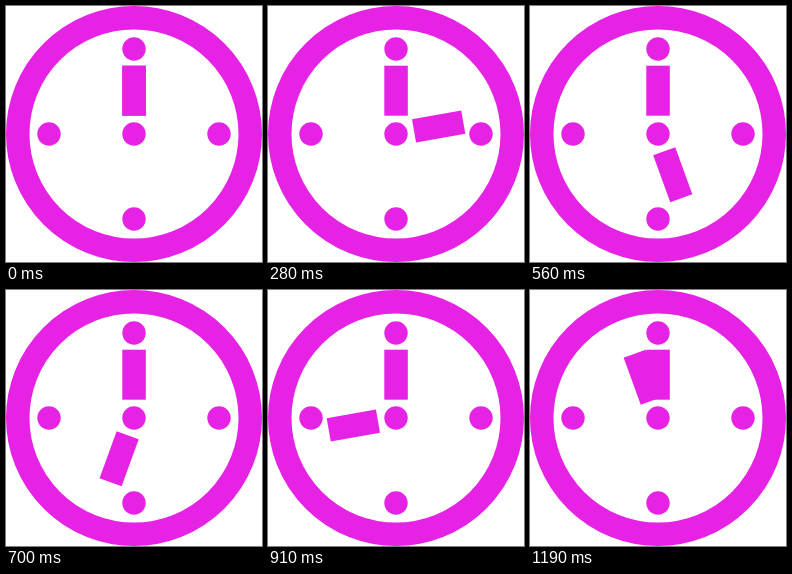
Write an HTML page that moves like this. It is 256 by 256 pixels and loops after 1260 ms.

```html
<!DOCTYPE html>
<html lang="en">
<head>
<meta charset="utf-8">
<title>Clock</title>
<style>
  html, body { margin: 0; width: 100%; height: 100%; overflow: hidden; background: #fff; }
  svg { display: block; width: 100%; height: 100%; fill: #e622e4; }
</style>
</head>
<body>
<svg viewBox="0 0 256 256">
  <circle cx="128" cy="128" r="116.25" fill="none" stroke="#e622e4" stroke-width="23.5"/>
  <circle cx="128" cy="43" r="11.7"/>
  <circle cx="213" cy="128" r="11.7"/>
  <circle cx="128" cy="213" r="11.7"/>
  <circle cx="43" cy="128" r="11.7"/>
  <circle cx="128" cy="128" r="11.7"/>
  <rect x="116.3" y="59.7" width="23.5" height="50"/>
  <rect id="hand" x="116.3" y="59.7" width="23.5" height="50"/>
</svg>
<script>
  const STEP = 70, STEPS = 18;
  const hand = document.getElementById('hand');
  const start = performance.now();

  // The hand jumps 20 degrees per step, one turn per loop.
  function draw(now) {
    const step = Math.floor(Math.max(0, now - start) / STEP) % STEPS;
    hand.setAttribute('transform', `rotate(${step * 360 / STEPS} 128 128)`);
    requestAnimationFrame(draw);
  }
  draw(start);
</script>
</body>
</html>
```
